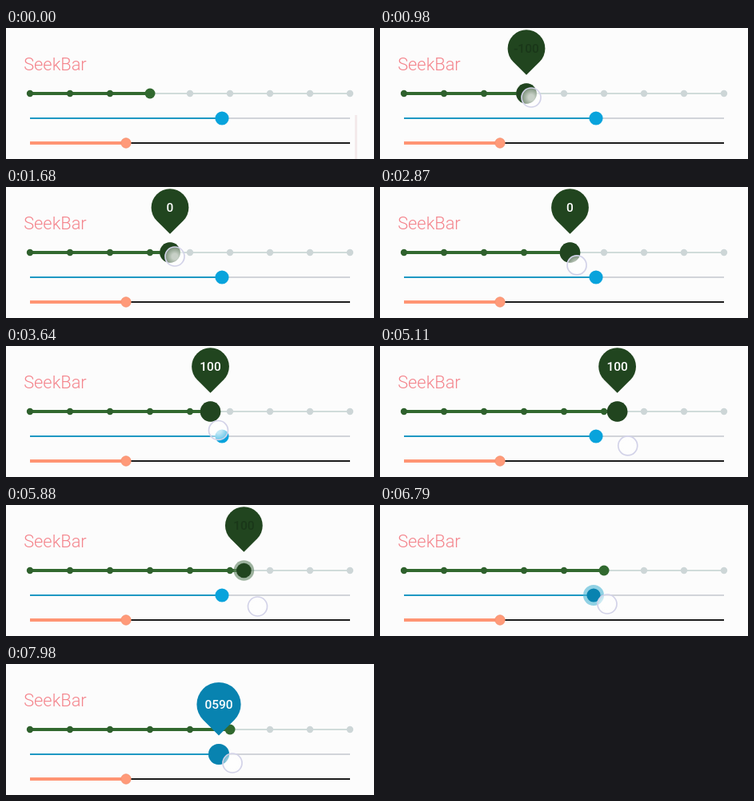
Recreate the animation shown at these times as an HTML page. Size 460 by 164 pixels, loop 8000 ms.

```html
<!DOCTYPE html>
<html lang="en">
<head>
<meta charset="utf-8">
<title>SeekBar</title>
<style>
  html, body { margin: 0; width: 100%; height: 100%; overflow: hidden; background: #fcfcfc; }
  svg { display: block; width: 460px; height: 164px; }
  text { font-family: Roboto, Arial, sans-serif; }
  .title { font-size: 21.8px; font-weight: 300; fill: #f4848c; }
  .value { font-size: 15.5px; font-weight: 500; text-anchor: middle; }
</style>
</head>
<body>
<svg id="stage" viewBox="0 0 460 164">
  <radialGradient id="glass">
    <stop offset="0.3" stop-color="#fff" stop-opacity="0.75"/>
    <stop offset="1" stop-color="#fff" stop-opacity="0.4"/>
  </radialGradient>
  <rect width="460" height="164" fill="#fcfcfc"/>
  <text class="title" x="22.2" y="53">SeekBar</text>
</svg>
<script>
const LOOP = 8000, STEP = 70, LEFT = 30, RIGHT = 430, GAP = 50;
const stage = document.getElementById('stage');

function set(el, attrs) {
  for (const key in attrs) el.setAttribute(key, attrs[key]);
}
function add(tag, attrs = {}) {
  const el = document.createElementNS('http://www.w3.org/2000/svg', tag);
  set(el, attrs);
  return stage.appendChild(el);
}
const line = (y, x1, x2, stroke, width) =>
  add('line', { x1, x2, y1: y, y2: y, stroke, 'stroke-width': width });

const lerp = (a, b, p) => a + (b - a) * p;
const phase = (t, from, span) => Math.min(1, Math.max(0, (t - from) / span));
const mix = (a, b, p) => `rgb(${a.map((v, i) => Math.round(lerp(v, b[i], p)))})`;

// Key points of the first drag: [time, thumb x]
const path = [[210, 180], [980, 183], [1680, 205], [2870, 237.5], [3500, 250], [4480, 288.7], [5460, 301]];
const drag = t => path.slice(1).reduce((x, [time, next], i) =>
  lerp(x, next, phase(t, path[i][0], time - path[i][0])), path[0][1]);

// Rounded drop whose tip sharpens as it opens
function drop(r, open) {
  const c = r * (1 - open);
  return `M0 ${r}A${r} ${r} 0 1 1 ${r} 0V${r - c}A${c} ${c} 0 0 1 ${r - c} ${r}Z`;
}

const green = {
  y: 82, rest: 6.5, big: 12.8, bubbleY: 25.7, bubbleR: 23.4, down: 140, up: 5530,
  color: [49, 105, 47], dark: [33, 69, 31], halo: '#5f8260',
  held: drag,
  x: t => lerp(drag(t), 280, phase(t, 5530, 840) ** 2),
  format: x => String((Math.round((x - LEFT) / GAP) - 4) * 100),
  finger(x) {
    const pull = Math.max(0, (x - 205) / 96);
    return { cx: x + 6 + 7.5 * pull, cy: 87 + 40 * pull ** 1.2 };
  }
};
const nudge = t => 270 - 3 * phase(t, 6580, 140) - phase(t, 7700, 280);
const blue = {
  y: 113, rest: 8.6, big: 13, bubbleY: 50.5, bubbleR: 27.6, down: 6580, up: Infinity,
  color: [8, 163, 220], dark: [8, 131, 176], halo: '#48b4d4',
  held: nudge,
  x: nudge,
  format: x => String(Math.round((x - LEFT) * 2.5)).padStart(4, '0'),
  finger: x => ({ cx: x + 17, cy: 124 })
};

const scrollbar = add('rect', { x: 436, y: 109, width: 3, height: 55, fill: '#f3eaeb' });

line(green.y, LEFT, RIGHT, '#d0dcda', 1.8);
green.track = line(green.y, LEFT, LEFT, '#32692f', 4);
const ticks = Array.from({ length: 9 }, (_, i) =>
  add('circle', { cx: LEFT + i * GAP, cy: green.y, r: 4.2 }));
line(blue.y, LEFT, RIGHT, '#d1d4d9', 1.9);
blue.track = line(blue.y, LEFT, LEFT, '#1e98c3', 2.2);
line(144, LEFT, RIGHT, '#1c1c1c', 2);
line(144, LEFT, 150, '#ff9473', 4.2);
add('circle', { cx: 150, cy: 144, r: 6.2, fill: '#ff9a79', stroke: '#f48e6c', 'stroke-width': 0.8 });

const bars = [green, blue];
for (const bar of bars) {
  bar.ring = add('circle', { cy: bar.y, fill: bar.halo, 'fill-opacity': 0.6 });
  bar.thumb = add('circle', { cy: bar.y });
  bar.bubble = add('path');
  bar.text = add('text', { class: 'value', y: bar.bubbleY + 5.7 });
}
const finger = add('circle', {
  r: 12, fill: 'url(#glass)', stroke: '#d2d2e8', 'stroke-width': 1.7
});

// Press: ring, growing thumb, bubble, then label; release undoes them
function pose(bar, t) {
  const { down, up } = bar;
  return {
    ring: phase(t, down, 210) - phase(t, up + 350, 630),
    grow: phase(t, down + 210, 420) - phase(t, up, 640),
    open: phase(t, down + 210, 630) - phase(t, up + 350, 490),
    label: phase(t, down + 840, 210) - phase(t, up, 350),
    touch: phase(t, down, 140) - phase(t, up + 420, 210)
  };
}

function drawBar(bar, t) {
  const { ring, grow, open, label, touch } = pose(bar, t);
  const x = bar.x(t), fill = mix(bar.color, bar.dark, ring);
  const ink = mix(bar.dark.map(v => v * 0.8), [255, 255, 255], label);
  const size = lerp(bar.rest, bar.bubbleR, open);
  const rise = lerp(bar.y, bar.bubbleY, open);

  set(bar.track, { x2: x });
  set(bar.ring, { cx: x, r: lerp(bar.rest, bar.big, ring), opacity: ring });
  set(bar.thumb, { cx: x, r: lerp(bar.rest, bar.big, grow), fill });
  set(bar.bubble, {
    d: drop(size, open), fill, opacity: open > 0 ? 1 : 0,
    transform: `translate(${x} ${rise}) rotate(45)`
  });
  set(bar.text, { x, fill: ink, opacity: open === 1 ? 1 : 0 });
  bar.text.textContent = bar.format(x);
  if (touch > 0) set(finger, { ...bar.finger(bar.held(t)), opacity: touch });
}

function draw(now) {
  const t = Math.floor((now % LOOP) / STEP) * STEP;
  set(scrollbar, { opacity: t < STEP ? 1 : 0 });
  set(finger, { opacity: 0 });
  bars.forEach(bar => drawBar(bar, t));
  ticks.forEach((dot, i) =>
    set(dot, { fill: LEFT + i * GAP <= green.x(t) ? '#2f612d' : '#cdd6d7' }));
}

const start = performance.now();
function tick() {
  draw(performance.now() - start);
  requestAnimationFrame(tick);
}
tick();
</script>
</body>
</html>
```
